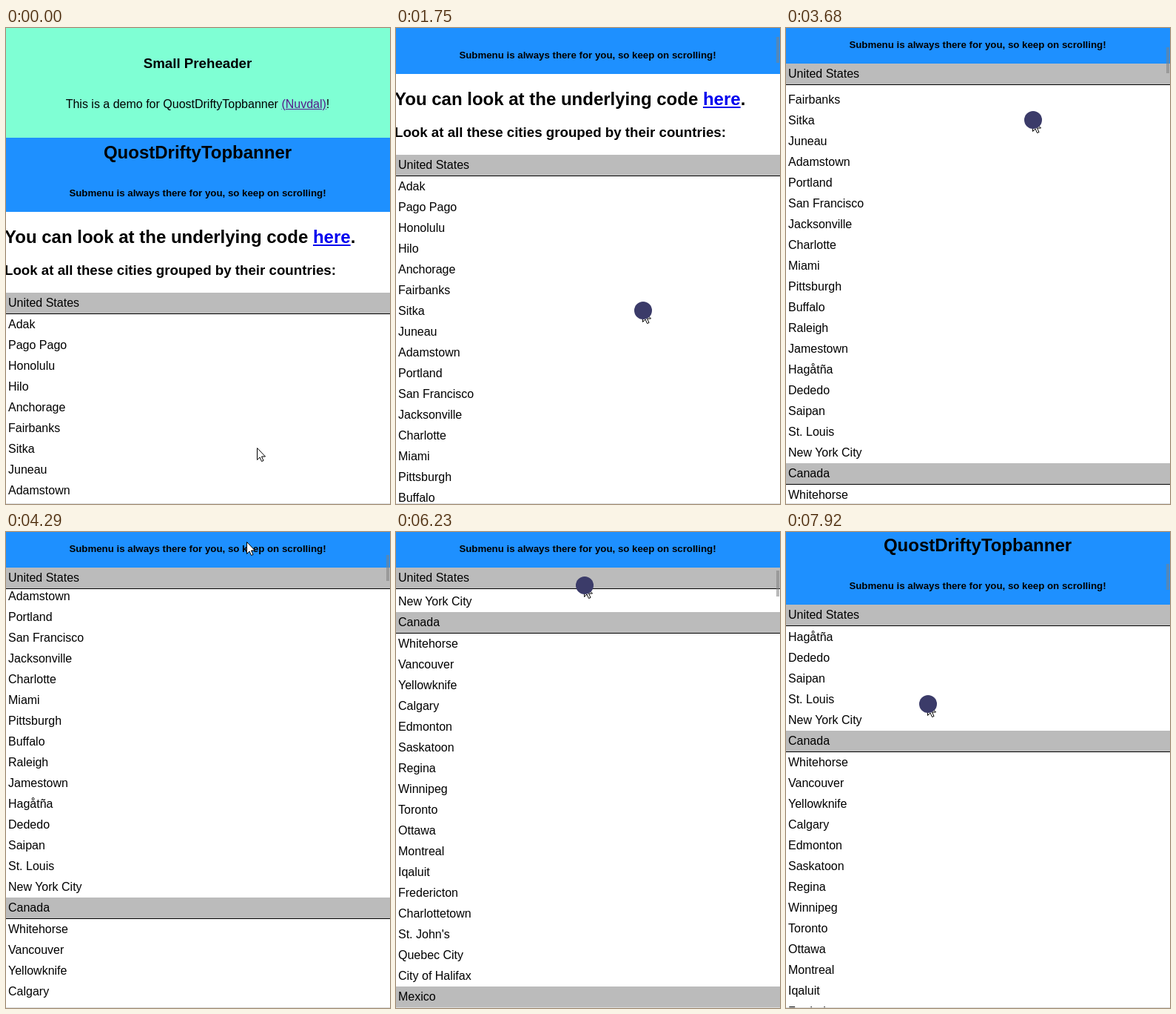
These frames come from a looping animation (519x642 px, 8 s). An HTML page:

```html
<!DOCTYPE html>
<html lang="en">
<head>
<meta charset="utf-8">
<title>Sticky header demo</title>
<style>
  html, body { margin: 0; width: 100%; height: 100%; overflow: hidden; background: #fff; }
  body { position: relative; font: 16px "Liberation Sans", Arial, sans-serif; color: #000; }
  #page { position: absolute; left: -1px; top: 0; width: 520px; height: 642px; overflow: hidden; isolation: isolate; --reveal: 0px; }
  header { position: relative; height: 148px; background: #7fffd4; text-align: center; }
  nav { position: sticky; top: calc(-52px + var(--reveal)); z-index: 3; height: 100px; background: #1e90ff; text-align: center; }
  header > *, nav > * { position: absolute; left: 0; width: 100%; margin: 0; }
  header h3 { top: 37px; }
  header p { top: 94px; }
  nav h2 { top: 6px; }
  nav h5 { top: 67px; }
  main { display: flow-root; height: 109px; margin-left: -1px; }
  u { color: #00e; }
  header u { color: #551a8b; }
  section div { padding: 5px 4px; height: 18px; white-space: nowrap; }
  section .country { position: sticky; top: calc(48px + var(--reveal)); z-index: 2; background: #bbb; border-bottom: 1px solid #000; }
  #thumb { position: absolute; left: 514px; top: 0; width: 4px; height: 35px; background: rgba(128, 128, 128, .55); }
  #edge { position: absolute; left: 0; top: 641px; width: 519px; height: 1px; background: #dcdcdc; }
  #pointer { position: absolute; left: 0; top: 0; overflow: visible; }
</style>
</head>
<body>
<div id="page">
  <header>
    <h3>Small Preheader</h3>
    <p>This is a demo for QuostDriftyTopbanner <u>(Nuvdal)</u>!</p>
  </header>
  <nav>
    <h2>QuostDriftyTopbanner</h2>
    <h5>Submenu is always there for you, so keep on scrolling!</h5>
  </nav>
  <main>
    <h2>You can look at the underlying code <u>here</u>.</h2>
    <h3>Look at all these cities grouped by their countries:</h3>
  </main>
</div>
<div id="thumb"></div>
<div id="edge"></div>
<svg id="pointer" width="1" height="1">
  <path d="M-.5 -.5V15.5L3 12L5.5 17.5L8 16.5L5.5 11H10.5Z" fill="#fff" stroke="#000"/>
  <circle id="touch" r="12" fill="#3b3b69"/>
</svg>
<script>
const LOOP = 8000;
const byId = id => document.getElementById(id);
const page = byId('page'), thumb = byId('thumb'), pointer = byId('pointer'), touch = byId('touch');

const countries = {
  'United States': "Adak,Pago Pago,Honolulu,Hilo,Anchorage,Fairbanks,Sitka,Juneau,Adamstown,Portland,San Francisco,Jacksonville,Charlotte,Miami,Pittsburgh,Buffalo,Raleigh,Jamestown,Hagåtña,Dededo,Saipan,St. Louis,New York City",
  'Canada': "Whitehorse,Vancouver,Yellowknife,Calgary,Edmonton,Saskatoon,Regina,Winnipeg,Toronto,Ottawa,Montreal,Iqaluit,Fredericton,Charlottetown,St. John's,Quebec City,City of Halifax",
  'Mexico': "Tijuana,Mexicali,Chihuahua,Durango,Culiacan"
};

function addRow(parent, text, className = '') {
  const row = document.createElement('div');
  row.textContent = text;
  row.className = className;
  parent.append(row);
}

for (const [country, cities] of Object.entries(countries)) {
  const section = document.createElement('section');
  addRow(section, country, 'country');
  cities.split(',').forEach(city => addRow(section, city));
  page.append(section);
}

const ramp = (t, from, to) => Math.min(1, Math.max(0, (t - from) / (to - from)));
const smooth = k => k * k * (3 - 2 * k);

// A chain of eased-in legs: every leg adds its own distance over its own time.
const travel = (t, start, legs) =>
  legs.reduce((sum, [from, to, distance]) => sum + distance * ramp(t, from, to), start);

// Two drags up the list, a pause, then a drag back down.
const scrollAt = t => travel(t, 0, [
  [260, 1750, 186], [1750, 2910, 137], [2910, 4290, 214],
  [4290, 5540, 287], [5540, 6920, 195], [7170, 7920, -257]
]);

const pointerX = t => travel(t, 340, [
  [70, 110, -20], [260, 2910, 24], [2910, 4290, -18], [4290, 4720, -45], [5540, 7920, -89]
]);

// The finger moves with the list, so its height is a grip point minus the scroll.
function pointerY(t) {
  const slop = 11 * (ramp(t, 70, 110) - ramp(t, 260, 400));
  const lift = -16 * ramp(t, 4200, 4290);
  const regrip = 443 * smooth(ramp(t, 4290, 4720));
  return 567 + slop + lift + regrip - scrollAt(t);
}

function draw(now) {
  const t = now % LOOP;
  const scroll = Math.round(scrollAt(t));
  const touching = (t >= 110 && t < 4250) || t >= 4720;

  page.style.setProperty('--reveal', 50 * smooth(ramp(t, 7300, 7500)) + 'px');
  page.scrollTop = scroll;
  thumb.style.transform = `translateY(${Math.round(2.3 + scroll * .0535)}px)`;
  thumb.style.visibility = t < 260 ? 'hidden' : 'visible';
  pointer.style.transform = `translate(${Math.round(pointerX(t))}px, ${Math.round(pointerY(t))}px)`;
  touch.style.visibility = touching ? 'visible' : 'hidden';
}

const start = performance.now();
function tick() {
  draw(performance.now() - start);
  requestAnimationFrame(tick);
}
tick();
</script>
</body>
</html>
```
